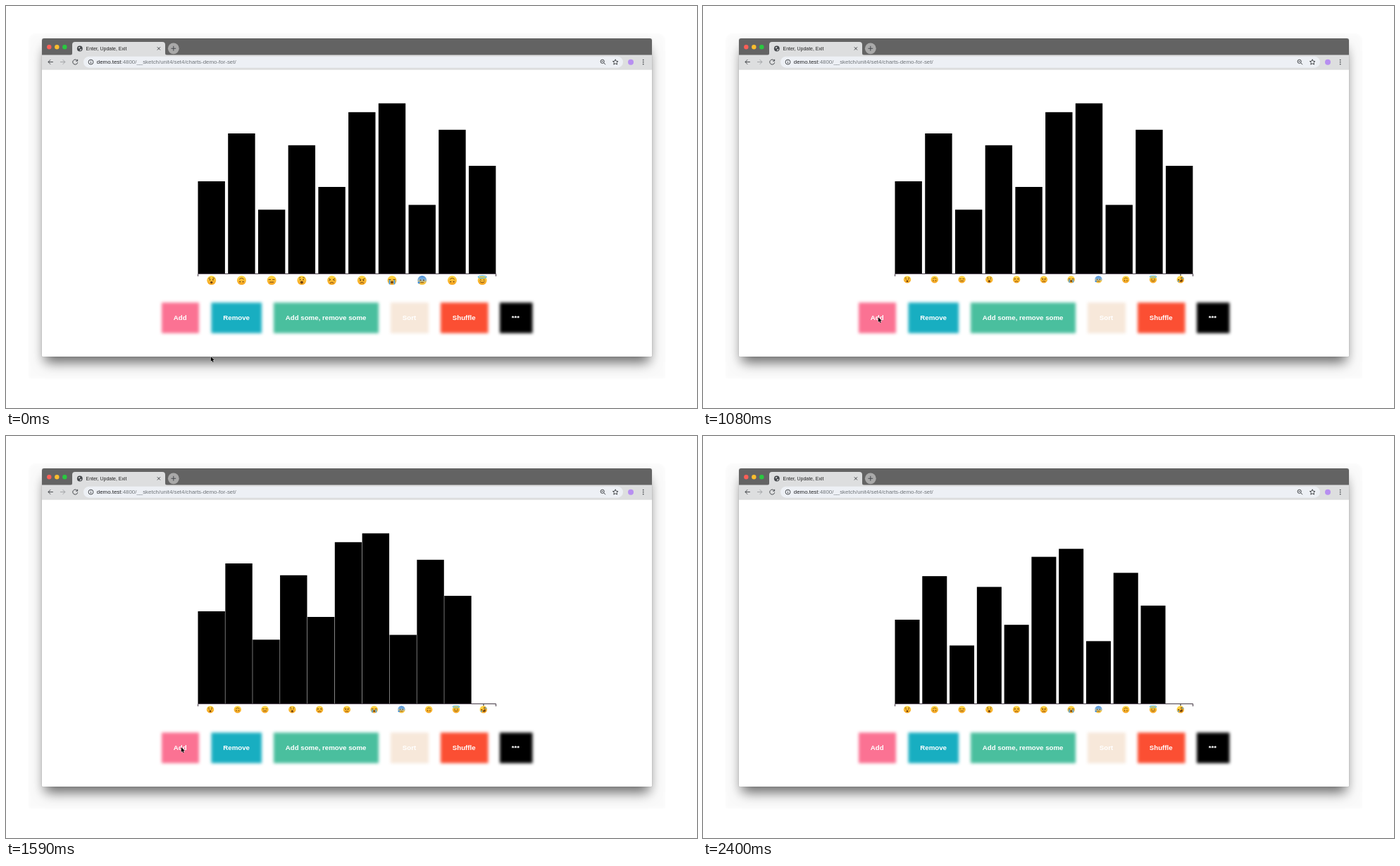
An HTML page that plays this animation: 981 px wide and 571 px high, repeating every 2.43 s.

```html
<!DOCTYPE html>
<html lang="en">
<head>
<meta charset="utf-8">
<title>Enter, Update, Exit</title>
<style>
  html, body { margin: 0; width: 100%; height: 100%; overflow: hidden; background: #fff; }
  svg { display: block; position: absolute; left: 0; top: 0; }
  text { font-family: "Liberation Sans", Arial, sans-serif; }
  .window {
    position: absolute; left: 51px; top: 46px; width: 866px; height: 452px;
    border-radius: 3px 3px 1px 1px; background: #fff;
    box-shadow: 0 0 1px rgba(0,0,0,.4), 0 13px 17px -5px rgba(0,0,0,.55),
      0 8px 14px rgba(0,0,0,.07), 0 12px 3px 19px rgba(0,0,0,.018);
  }
  .line { fill: none; stroke: #46494d; stroke-width: 1; }
  .label { font-weight: bold; font-size: 9.7px; fill: #fff; }
  .soft { filter: blur(1.9px); }
  .ink { fill: none; stroke: #70420f; stroke-width: .95; stroke-linecap: round; }
  .dot { fill: #70420f; }

  .bar, .cursor, .before, .after { animation: 2430ms infinite; }
  .bar { animation-name: slide, shrink; transform-origin: 0 0; }
  .cursor { animation-name: point, leave; animation-timing-function: linear, step-end; }
  .before { animation-name: before; animation-timing-function: step-end; }
  .after { animation-name: after; animation-timing-function: step-end; }

  @keyframes slide {
    0%, 44.57% { translate: 0 0; animation-timing-function: cubic-bezier(.65,0,.35,1); }
    69.05%, 100% { translate: var(--dx) 0; }
  }
  @keyframes shrink {
    0%, 69.14% { scale: 1 1; animation-timing-function: cubic-bezier(.65,0,.35,1); }
    81.48%, 100% { scale: .9115 .9091; }
  }
  @keyframes point {
    0%, 3.7% { translate: 290.8px 498px; animation-timing-function: cubic-bezier(.45,0,.4,1); }
    22.2%, 100% { translate: 248.8px 442px; }
  }
  @keyframes leave { 0% { visibility: visible; } 91.3%, 100% { visibility: hidden; } }
  @keyframes before { 0% { visibility: visible; } 44.4%, 100% { visibility: hidden; } }
  @keyframes after { 0% { visibility: hidden; } 44.4%, 100% { visibility: visible; } }
</style>
</head>
<body>
<div class="window"></div>
<svg width="981" height="571" viewBox="0 0 981 571">
  <defs>
    <linearGradient id="skin" x2="0" y2="1">
      <stop offset="0" stop-color="#ffdc4d"/><stop offset="1" stop-color="#f5a01c"/>
    </linearGradient>
    <linearGradient id="cold" x2="0" y2="1">
      <stop offset="0" stop-color="#4b8fdc"/><stop offset=".45" stop-color="#86b6dc"/>
      <stop offset=".75" stop-color="#f8c23c"/>
    </linearGradient>
  </defs>

  <!-- browser frame -->
  <path d="M51 70V49q0-3 3-3H914q3 0 3 3V70z" fill="#636363"/>
  <circle cx="61.3" cy="58.3" r="3.2" fill="#fb5f57"/>
  <circle cx="72.3" cy="58.3" r="3.2" fill="#fbbd2e"/>
  <circle cx="83.3" cy="58.3" r="3.2" fill="#29c940"/>
  <path d="M91 70q3 0 3-3V55q0-4 4-4H222q4 0 4 4V67q0 3 3 3z" fill="#dddedf"/>
  <rect x="51" y="69.5" width="866" height="20.5" fill="#dddedf"/>
  <path d="M51 90.3H917" stroke="#cfcfcf" stroke-width=".6"/>
  <circle cx="104.8" cy="60.5" r="3.9" fill="#45484c"/>
  <path d="M102.3 59.5l2-1.6 1.2 1.2-1.4 1.5zM104.5 62l2.4-1 .4 1.2-1.8 1.2z" fill="#dddedf"/>
  <text x="113.5" y="62.8" font-size="6.95" fill="#222">Enter, Update, Exit</text>
  <path class="line" d="M214.8 58.3l4.2 4.2m0-4.2l-4.2 4.2"/>
  <circle cx="237.8" cy="60.3" r="7.9" fill="#a9a9a9"/>
  <path class="line" d="M234.4 60.3h6.8M237.8 56.9v6.8" stroke-width="1.2"/>
  <rect x="110" y="71.7" width="766" height="16" rx="8" fill="#edf0f5"/>
  <path class="line" d="M66.8 79.5H60m3.2-3.3L59.9 79.5l3.3 3.3"/>
  <path class="line" d="M77 79.5h6.8m-3.2-3.3l3.3 3.3-3.3 3.3" style="stroke:#a2a4a7"/>
  <path class="line" d="M101 77.4a3.5 3.5 0 1 0 .7 2.8M101.6 75.8v2.4h-2.4"/>
  <circle class="line" cx="120.5" cy="79.6" r="3.4" stroke-width=".8"/>
  <path class="line" d="M120.5 79.2v2.3M120.5 77.5v.8" stroke-width=".8"/>
  <text x="128.8" y="82.2" font-size="7.9" fill="#70757a"><tspan fill="#202124">demo.test</tspan>:4800/__sketch/unit4/set4/charts-demo-for-set/</text>
  <circle class="line" cx="846.7" cy="78.8" r="2.6"/>
  <path class="line" d="M848.6 80.7l2.5 2.5M845.5 78.8h2.4" stroke-width=".9"/>
  <path class="line" d="M865.2 75.8l1.1 2.5 2.7.3-2 1.8.6 2.7-2.4-1.4-2.4 1.4.6-2.7-2-1.8 2.7-.3z" stroke-width=".8"/>
  <circle cx="887" cy="79.8" r="4" fill="#b78ff0"/>
  <g fill="#45484c"><circle cx="904.7" cy="76.6" r=".9"/><circle cx="904.7" cy="79.6" r=".9"/><circle cx="904.7" cy="82.6" r=".9"/></g>

  <g id="bars"></g>
  <path d="M272.6 384v-3.6H695.6V384" fill="none" stroke="#3f3440" stroke-width="1"/>
  <path class="after" d="M678 380.5v3.5" stroke="#222"/>
  <g id="old" class="before"></g>
  <g id="new" class="after"></g>
  <g id="buttons"></g>
  <path class="cursor" d="M0 0V7l1.6-1.4 1.1 2.4 1.2-.5-1-2.4H5z" stroke="#fff" stroke-width=".7" paint-order="stroke" fill="#000"/>
</svg>
<script>
  const $ = id => document.getElementById(id);
  const left = 272.5, base = 380, wide = 42.72, narrow = 38.78;
  const tops = [249, 181, 289.3, 197.8, 257, 150.8, 138.3, 282.5, 175.8, 227];

  $('bars').innerHTML = tops.map((top, i) =>
    `<g transform="translate(${left + i * wide} ${base})">
      <rect class="bar" style="--dx:${(narrow - wide) * i}px" y="${top - base}" width="38.4" height="${base - top}"/>
    </g>`).join('');

  const ink = d => `<path class="ink" d="${d}"/>`;
  const spot = (x, y, r) => `<circle class="dot" cx="${x}" cy="${y}" r="${r}"/>`;
  const eyes = y => spot(-2.2, y, .95) + spot(2.2, y, .95);
  const frown = ink('M-2.3 3.8Q0 1.6 2.3 3.8');
  const tears = (x, y, h) => [-x, x].map(c =>
    `<rect x="${c - 1}" y="${y}" width="2" height="${h}" rx="1" fill="#4aa5e8"/>`).join('');
  const head = fill => `<circle r="6.5" fill="url(#${fill})"/>`;
  const skin = head('skin');

  const upside = skin + eyes(2) + ink('M-3-1.6Q0-4.8 3-1.6');
  const faces = [
    skin + eyes(-.8) + ink('M-4-2.7l2-.8M4-2.7l-2-.8') + spot(0, 3, 1.7),
    upside,
    skin + ink('M-4-1h2.6M1.4-1H4M-2.5 2.6h5'),
    skin + eyes(-1) + ink('M-3.6-3.4l1.8-.6M3.6-3.4l-1.8-.6') + spot(0, 3, 2),
    skin + ink('M-4-2.2l2.4 1.2-2.4 1.2M4-2.2L1.6-1 4 .2') + frown,
    skin + ink('M-4-2.4l2.8 1.3M4-2.4L1.2-1.1') + eyes(.1) + frown,
    skin + tears(3.4, -.6, 6.4) + ink('M-4.4-1h2.6M1.8-1h2.6') + spot(0, 2.8, 1.8),
    head('cold') + eyes(-.2) + ink('M-2 3.2h4') + '<circle cx="-4.6" cy="3.2" r="1.6" fill="#3f8ee0"/>',
    upside,
    skin + ink('M-3.4-.4q1-1.4 2 0M1.4-.4q1-1.4 2 0M-3 2Q0 4.8 3 2') +
      '<ellipse cy="-4.8" rx="5.8" ry="1.7" fill="none" stroke="#55b4e0" stroke-width="1.3"/>',
    `<g transform="rotate(-35)">${skin}${tears(4.8, -1, 3)}${ink('M-3.6-2.2l1.8 1-1.8 .8M3.6-2.2l-1.8 1 1.8 .8')}
      <path d="M-3 1H3Q2.6 4.8 0 4.8T-3 1z" fill="#70420f"/></g>`
  ];
  const row = (n, x, step, y, size) => faces.slice(0, n).map((f, i) =>
    `<g transform="translate(${x + step * i} ${y}) scale(${size})">${f}</g>`).join('');
  $('old').innerHTML = row(10, 291.7, wide, 389.6, 1);
  $('new').innerHTML = row(11, 290, narrow, 388.4, .8);

  const buttons = [
    ['Add', 221, 53, '#fb7293'],
    ['Remove', 291.5, 71.5, '#18aec1'],
    ['Add some, remove some', 380, 149, '#4abf9e'],
    ['Sort', 546, 54, '#f7e8da'],
    ['Shuffle', 617, 67.5, '#fb4f33'],
    ['***', 701, 46.5, '#000']
  ];
  $('buttons').innerHTML = buttons.map(([label, x, w, color]) =>
    `<rect class="soft" x="${x}" y="421.3" width="${w}" height="43.4" fill="${color}"/>
     <text class="label" x="${x + 16.8}" y="446.4">${label}</text>`).join('');
</script>
</body>
</html>
```
